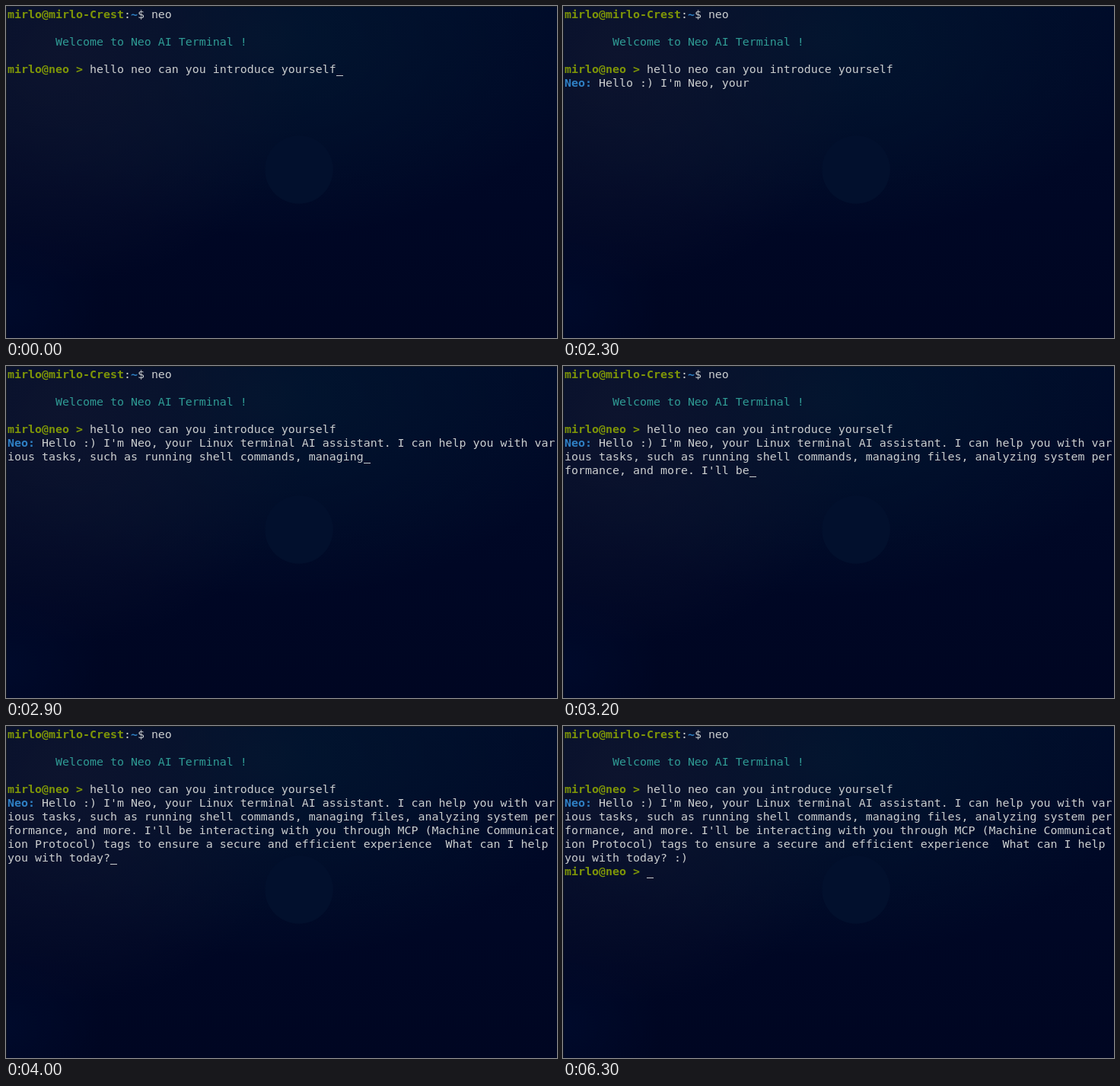
These frames come from a looping animation (724x436 px, 6.7 s). An HTML page:

```html
<!DOCTYPE html>
<html lang="en">
<head>
<meta charset="utf-8">
<title>Terminal assistant</title>
<style>
  html, body { margin: 0; width: 100%; height: 100%; overflow: hidden; }
  body {
    position: relative;
    background:
      linear-gradient(#14191f, #14191f) 0 0 / 100% 1px no-repeat,
      linear-gradient(#14191f, #0a0f1c) 0 0 / 1px 100% no-repeat,
      radial-gradient(circle 45px at 385px 215px, #02102d 98%, transparent),
      radial-gradient(ellipse 130px 110px at 0 90%, #000a2b, transparent),
      radial-gradient(ellipse 330px 300px at 10% 15%, #0d142e, transparent),
      radial-gradient(ellipse 420px 260px at 48% 10%, #02152f, transparent),
      linear-gradient(#000b29, #000725 60%, #000622);
  }
  #screen {
    position: absolute; left: 2px; top: 2px; margin: 0;
    font: 14.95px/18px "DejaVu Sans Mono", monospace;
    white-space: pre; color: #cbcecf;
  }
  b { color: #7f9607; }
  .blue { color: #2f80c4; }
  .cyan { color: #2f9b94; }
  i { position: absolute; width: 9px; height: 1px; margin-top: 17px; background: #cbcecf; }
</style>
</head>
<body>
<pre id="screen"></pre>
<script>
const LOOP = 6700, COLUMNS = 80;
const screenEl = document.getElementById("screen");

const prompt = "<b>mirlo@neo &gt;</b> ";
const header =
  '<b>mirlo@mirlo-Crest</b>:<b class="blue">~</b>$ neo\n\n' +
  '       <span class="cyan">Welcome to Neo AI Terminal !</span>\n\n' +
  prompt + "hello neo can you introduce yourself";

const words = ("Hello :) I'm Neo, your Linux terminal AI assistant. I can help you " +
  "with various tasks, such as running shell commands, managing files, analyzing " +
  "system performance, and more. I'll be interacting with you through MCP (Machine " +
  "Communication Protocol) tags to ensure a secure and efficient experience  What " +
  "can I help you with today? :)").match(/\s*\S+/g);

const wrap = text => text.replace(new RegExp(`.{${COLUMNS}}`, "g"), "$&\n");

// The reply streams in at a steady rate, updated every 100 ms.
function reply(tick) {
  const count = Math.max(0, Math.floor(5.1 + 2.82 * (tick - 23)));
  const text = wrap("Neo: " + words.slice(0, count).join(""));
  return '<b class="blue">Neo:</b>' + text.slice(4) +
    (count > words.length ? "\n" + prompt : "");
}

function render(t) {
  const tick = Math.floor(t / 100);
  const cursorOn = tick < 1 || Math.floor((tick - 3) / 6) % 2 === 0;
  let html = header;
  if (tick >= 21) html += "\n" + reply(tick);
  else if (tick >= 4) html += '\n<span class="blue">Thinking...</span>';
  return html + (cursorOn ? "<i></i>" : "");
}

let shown = "";
function frame() {
  const html = render(performance.now() % LOOP);
  if (html !== shown) screenEl.innerHTML = shown = html;
  requestAnimationFrame(frame);
}
frame();
</script>
</body>
</html>
```
